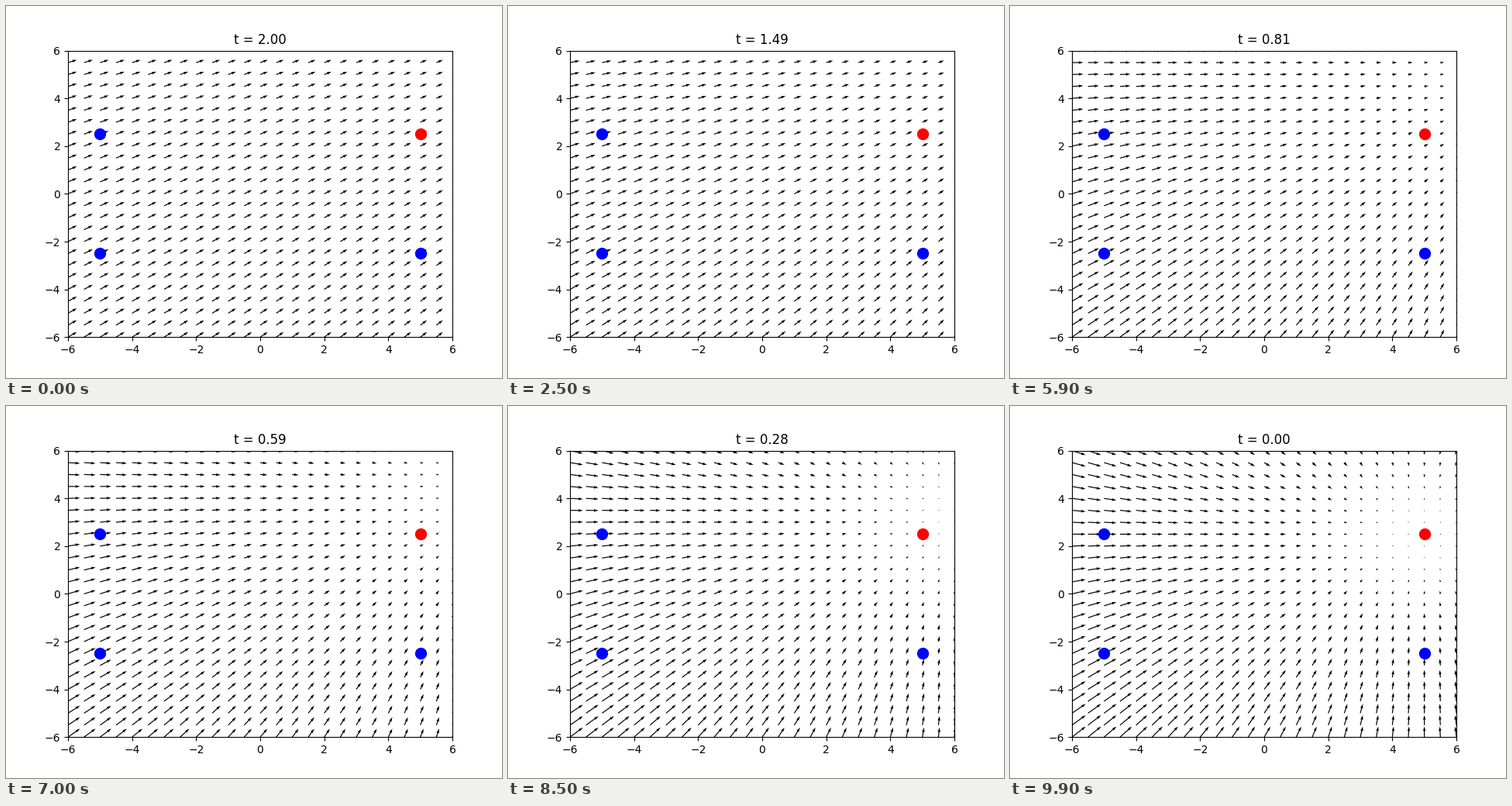
Animation of 640 by 480 pixels, one loop 10000 ms. Source, as a matplotlib script:

```python
import numpy as np
import matplotlib.pyplot as plt
from matplotlib.animation import FuncAnimation

FRAMES = 100
GOAL = (5, 2.5)
OTHERS = [(-5, 2.5), (-5, -2.5), (5, -2.5)]

axis = np.linspace(-6, 6, 25)
X, Y = np.meshgrid(axis, axis)


def field(t):
    """Pull towards the goal from the decayed position, with unit mean length."""
    u = GOAL[0] - X * np.exp(-t)
    v = GOAL[1] - Y * np.exp(-t)
    mean = np.hypot(u, v).mean()
    return u / mean, v / mean


fig, ax = plt.subplots(figsize=(6.4, 4.8), dpi=100)
ax.set(xlim=(-6, 6), ylim=(-6, 6))
arrows = ax.quiver(X, Y, *field(2), scale=1.8 * len(axis))
ax.plot(*zip(*OTHERS), "o", color="blue", ms=10)
ax.plot(*GOAL, "o", color="red", ms=10)
title = ax.set_title("")


def update(i):
    t = 2 * (1 - i / (FRAMES - 1))
    arrows.set_UVC(*field(t))
    title.set_text(f"t = {t:.2f}")
    return arrows, title


anim = FuncAnimation(fig, update, frames=FRAMES, interval=100,
                     repeat=True, repeat_delay=0)
plt.show()
```
